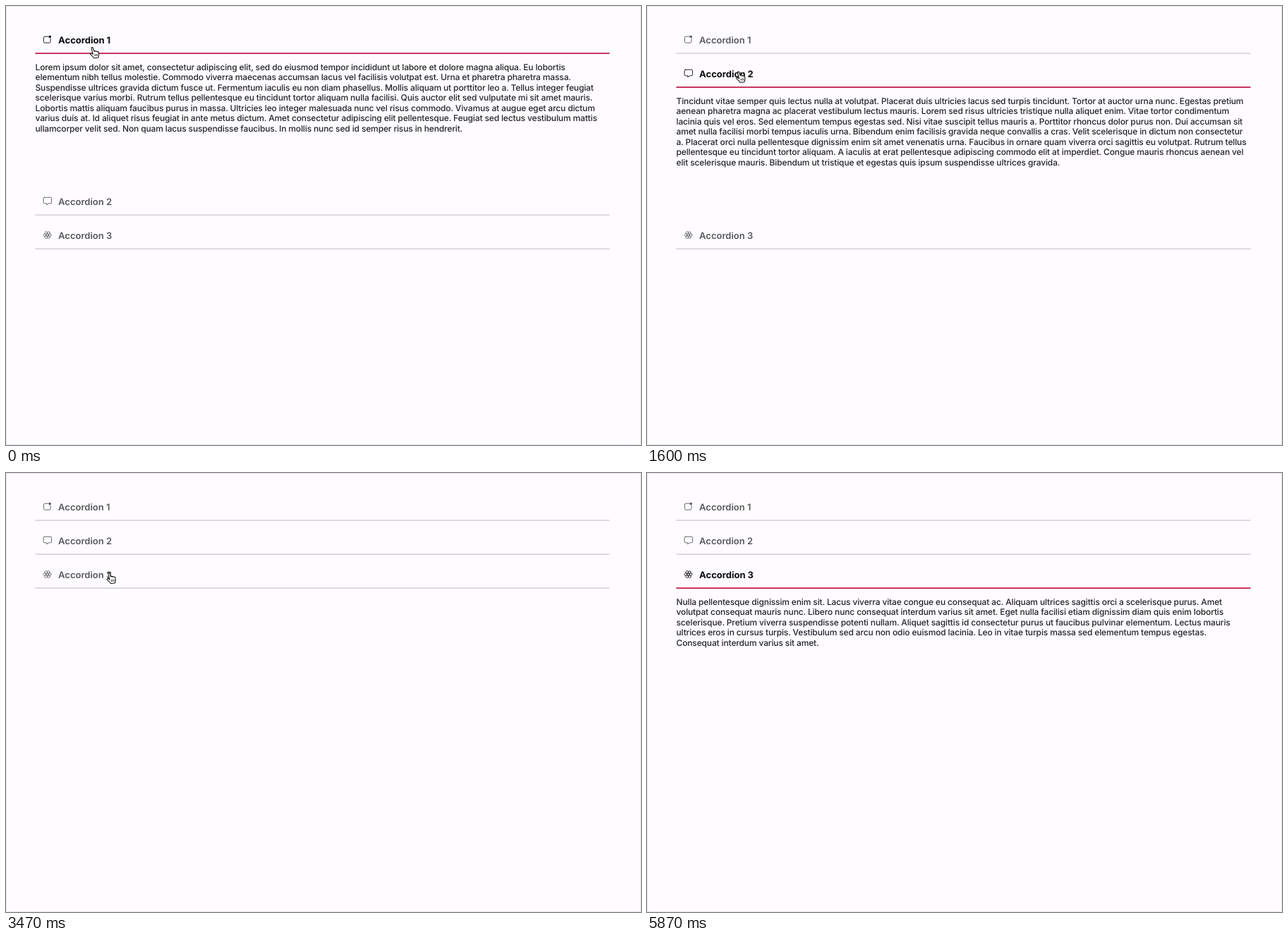
An HTML page with a canvas for the animation above (7 s loop, 900 by 622 pixels).

```html
<!DOCTYPE html>
<html lang="en">
<head>
<meta charset="utf-8">
<title>Accordion</title>
<style>
  html, body { margin: 0; width: 100%; height: 100%; overflow: hidden; background: #fefcff; }
  canvas { display: block; width: 900px; height: 622px; }
</style>
</head>
<body>
<canvas id="stage"></canvas>
<script>
const W = 900, H = 622, LOOP = 7000, STEP = 1000 / 15;
const LEFT = 41.5, RIGHT = 855.5, TOP = 20, HEAD = 48, PANEL = 181;
const FONT = 'Inter, "Liberation Sans", sans-serif';
const INK = '#252427', MUTED = '#59585b', ACTIVE = '#0b0a0c';
const RULE = '#d9d7db', ACCENT = '#c2224f';

const canvas = document.getElementById('stage');
const ctx = canvas.getContext('2d');
const dpr = window.devicePixelRatio || 1;
canvas.width = W * dpr;
canvas.height = H * dpr;

const items = [
  { icon: noteIcon, open: -1000, close: 518, lines: [
    'Lorem ipsum dolor sit amet, consectetur adipiscing elit, sed do eiusmod tempor incididunt ut labore et dolore magna aliqua. Eu lobortis',
    'elementum nibh tellus molestie. Commodo viverra maecenas accumsan lacus vel facilisis volutpat est. Urna et pharetra pharetra massa.',
    'Suspendisse ultrices gravida dictum fusce ut. Fermentum iaculis eu non diam phasellus. Mollis aliquam ut porttitor leo a. Tellus integer feugiat',
    'scelerisque varius morbi. Rutrum tellus pellentesque eu tincidunt tortor aliquam nulla facilisi. Quis auctor elit sed vulputate mi sit amet mauris.',
    'Lobortis mattis aliquam faucibus purus in massa. Ultricies leo integer malesuada nunc vel risus commodo. Vivamus at augue eget arcu dictum',
    'varius duis at. Id aliquet risus feugiat in ante metus dictum. Amet consectetur adipiscing elit pellentesque. Feugiat sed lectus vestibulum mattis',
    'ullamcorper velit sed. Non quam lacus suspendisse faucibus. In mollis nunc sed id semper risus in hendrerit.'
  ] },
  { icon: bubbleIcon, open: 1295, close: 2645, lines: [
    'Tincidunt vitae semper quis lectus nulla at volutpat. Placerat duis ultricies lacus sed turpis tincidunt. Tortor at auctor urna nunc. Egestas pretium',
    'aenean pharetra magna ac placerat vestibulum lectus mauris. Lorem sed risus ultricies tristique nulla aliquet enim. Vitae tortor condimentum',
    'lacinia quis vel eros. Sed elementum tempus egestas sed. Nisi vitae suscipit tellus mauris a. Porttitor rhoncus dolor purus non. Dui accumsan sit',
    'amet nulla facilisi morbi tempus iaculis urna. Bibendum enim facilisis gravida neque convallis a cras. Velit scelerisque in dictum non consectetur',
    'a. Placerat orci nulla pellentesque dignissim enim sit amet venenatis urna. Faucibus in ornare quam viverra orci sagittis eu volutpat. Rutrum tellus',
    'pellentesque eu tincidunt tortor aliquam. A iaculis at erat pellentesque adipiscing commodo elit at imperdiet. Congue mauris rhoncus aenean vel',
    'elit scelerisque mauris. Bibendum ut tristique et egestas quis ipsum suspendisse ultrices gravida.'
  ] },
  { icon: clusterIcon, open: 3490, close: Infinity, lines: [
    'Nulla pellentesque dignissim enim sit. Lacus viverra vitae congue eu consequat ac. Aliquam ultrices sagittis orci a scelerisque purus. Amet',
    'volutpat consequat mauris nunc. Libero nunc consequat interdum varius sit amet. Eget nulla facilisi etiam dignissim diam quis enim lobortis',
    'scelerisque. Pretium viverra suspendisse potenti nullam. Aliquet sagittis id consectetur purus ut faucibus pulvinar elementum. Lectus mauris',
    'ultrices eros in cursus turpis. Vestibulum sed arcu non odio euismod lacinia. Leo in vitae turpis massa sed elementum tempus egestas.',
    'Consequat interdum varius sit amet.'
  ] }
];

// Pointer moves: start, end, from x, from y, to x, to y
const moves = [
  [20, 200, 119, 58, 119.5, 47],
  [750, 1195, 119.5, 47, 126.3, 92.5],
  [2750, 3065, 126.3, 92.5, 133.5, 140.7],
  [3220, 3450, 133.5, 140.7, 142.7, 140.7],
  [5010, 5140, 142.7, 140.7, 276, 484]
];

const HAND = new Path2D('M2.1 1.9C1.9.5 3.8.1 4.3 1.5L6 6.4C6.2 5.2 7.9 5.2 8.2 6.6C8.6 5.6 10 5.8 10.3 7C10.8 6.2 12 6.5 12.3 7.8C12.7 9.5 12.9 10.8 12.3 12.5L11.6 15.3L5.7 15.8C4.7 14 3 12.5 1 10.9C-.3 9.8.8 8.3 2.1 9L4.2 10.3Z');
const CREASES = new Path2D('M6.6 10.3L6.9 13.2M8.4 10.1L8.7 13.1M10.2 9.9L10.5 12.9');
const ARROW = new Path2D('M1 1V13L3.9 10.3L5.9 15L8 14.1L6 9.6H10Z');
const BUBBLE = new Path2D('M2 .6H10.4Q12 .6 12 2.2V7.6Q12 9.2 10.4 9.2H7.7L5.2 11.3V9.2H2Q.5 9.2.5 7.6V2.2Q.5.6 2 .6Z');
const NOTE = new Path2D('M7.4 1.6H2.6Q.8 1.6.8 3.4V8.8Q.8 10.6 2.6 10.6H8.6Q10.4 10.6 10.4 8.8V4.5');

function dot(x, y, r) {
  ctx.beginPath();
  ctx.arc(x, y, r, 0, Math.PI * 2);
}

function noteIcon() {
  ctx.stroke(NOTE);
  dot(9.6, 2, 1.8);
  ctx.fill();
}

function bubbleIcon() {
  ctx.stroke(BUBBLE);
}

function clusterIcon() {
  ctx.lineWidth = 0.8;
  dot(6, 6, 1.6);
  ctx.stroke();
  for (let i = 0; i < 6; i++) {
    const a = i * Math.PI / 3;
    dot(6 + 3.6 * Math.cos(a), 6 + 3.6 * Math.sin(a), 1.8);
    ctx.stroke();
  }
}

// cubic-bezier(.4, 0, .2, 1)
function ease(x) {
  if (x <= 0) return 0;
  if (x >= 1) return 1;
  let lo = 0, hi = 1, s = 0.5;
  for (let i = 0; i < 20; i++) {
    s = (lo + hi) / 2;
    const bx = 1.2 * (1 - s) * (1 - s) * s + 0.6 * (1 - s) * s * s + s * s * s;
    if (bx < x) lo = s; else hi = s;
  }
  return s * s * (3 - 2 * s);
}

function text(str, x, y, font, color, spacing) {
  ctx.font = font + ' ' + FONT;
  ctx.textRendering = 'geometricPrecision';
  ctx.letterSpacing = spacing + 'px';
  ctx.fillStyle = color;
  ctx.fillText(str, x, y);
}

function drawItem(item, index, y, t) {
  const active = t >= item.open && t < item.close;
  const color = active ? ACTIVE : MUTED;

  ctx.save();
  ctx.translate(52.6, y + 21.6);
  ctx.strokeStyle = ctx.fillStyle = color;
  ctx.lineWidth = 0.9;
  ctx.lineJoin = ctx.lineCap = 'round';
  item.icon();
  ctx.restore();

  text('Accordion ' + (index + 1), 74.1, y + 32.6, (active ? 700 : 600) + ' 13px', color, 0);
  ctx.fillStyle = active ? ACCENT : RULE;
  ctx.fillRect(LEFT, y + 46.2, RIGHT - LEFT, 1.8);

  const height = PANEL * (ease((t - item.open) / 300) - ease((t - item.close) / 300));
  if (height > 0) {
    ctx.save();
    ctx.beginPath();
    ctx.rect(0, y + HEAD, W, height);
    ctx.clip();
    item.lines.forEach((line, i) =>
      text(line, LEFT, y + 70.7 + i * 14.5, '500 12px', INK, -0.14));
    ctx.restore();
  }
  return y + HEAD + height;
}

function drawPointer(t) {
  if (t > 5190) return;
  let x = moves[0][2], y = moves[0][3];
  for (const [start, end, x0, y0, x1, y1] of moves) {
    if (t < start) break;
    const p = Math.min(1, (t - start) / (end - start));
    const k = p * p * (3 - 2 * p);
    x = x0 + (x1 - x0) * k;
    y = y0 + (y1 - y0) * k;
  }
  const away = t > 5010;
  const shape = away ? ARROW : HAND;
  ctx.save();
  ctx.translate(x, y);
  ctx.lineJoin = 'round';
  ctx.fillStyle = away ? '#000' : '#fff';
  ctx.strokeStyle = away ? '#fff' : '#111';
  ctx.lineWidth = 1.1;
  ctx.fill(shape);
  ctx.stroke(shape);
  if (!away) {
    ctx.lineWidth = 0.8;
    ctx.stroke(CREASES);
  }
  ctx.restore();
}

function draw(now) {
  const t = Math.floor((now % LOOP + 4) / STEP) * STEP;
  ctx.setTransform(dpr, 0, 0, dpr, 0, 0);
  ctx.fillStyle = '#fefcff';
  ctx.fillRect(0, 0, W, H);
  ctx.strokeStyle = '#e9e7eb';
  ctx.lineWidth = 1;
  ctx.strokeRect(0.5, 0.5, W - 1, H - 1);

  let y = TOP;
  items.forEach((item, i) => { y = drawItem(item, i, y, t); });
  drawPointer(t);
}

let origin;
function tick(now) {
  if (origin === undefined) origin = now;
  draw(now - origin);
  requestAnimationFrame(tick);
}
requestAnimationFrame(tick);
</script>
</body>
</html>
```
